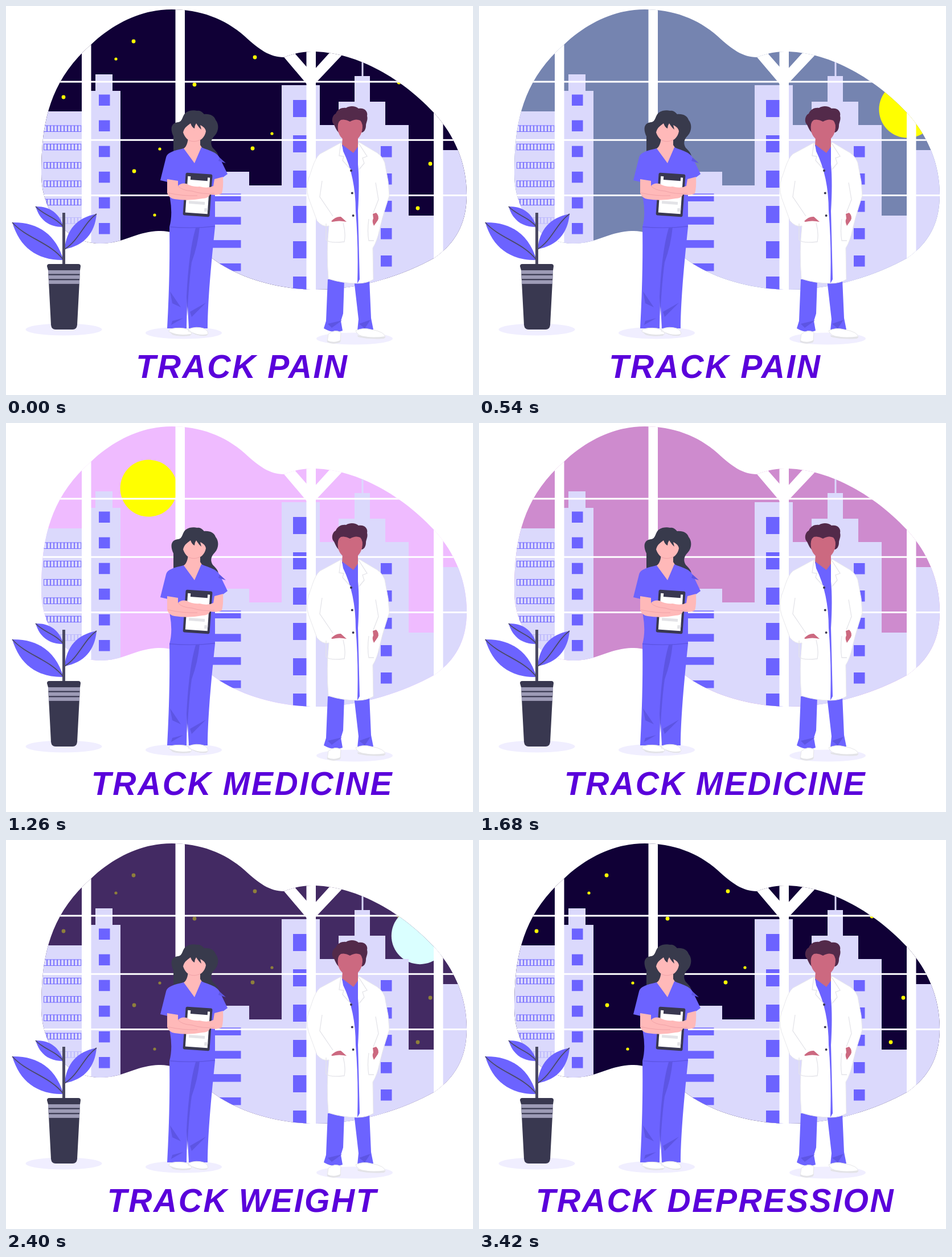
An HTML page that plays this animation: 820x683 px, repeating every 3.6 s.

```html
<!DOCTYPE html>
<html lang="en">
<head>
<meta charset="utf-8">
<title>Health tracker</title>
<style>
html, body { margin: 0; width: 100%; height: 100%; overflow: hidden; background: #fff; }
svg { display: block; width: 820px; height: 683px; }
#label { font: italic bold 57px "Liberation Sans", Arial, sans-serif; letter-spacing: 2.6px; fill: #5a00db; }
.blue { fill: #6c63ff; }
.fold { fill: #5d55e3; }
.dark { fill: #393850; }
.skin { fill: #ffb9b9; }
.tan { fill: #cc6980; }
.wall { fill: #dbd9fc; }
.seam { fill: none; stroke: #e4e4e9; stroke-width: 1.3; }
.crease { fill: none; stroke: #f1a3a8; }
.shoe { fill: #fff; stroke: #e6e6e9; }
.sole { fill: #e3e3e7; }
#shadows { fill: #f0eeff; }
#veins { fill: none; stroke: #4b4a68; stroke-width: 1.8; }
#panes { fill: none; stroke: #6c63ff; stroke-width: .9; }
</style>
</head>
<body>
<svg viewBox="0 0 820 683" xmlns="http://www.w3.org/2000/svg">
  <clipPath id="blob">
    <path d="M62 295C62 215 72 135 149 68C190 29 240 6 291 6C340 6 384 22 419 53C444 76 463 90 488 90C503 84 520 80 537 80C610 80 690 122 751 187C790 229 809 280 809 331C809 383 789 417 751 443C700 471 625 498 545 498C475 498 405 476 362 443C334 416 302 395 272 395C228 395 210 417 165 417C105 417 62 360 62 295Z"/>
  </clipPath>

  <g clip-path="url(#blob)">
    <rect id="sky" width="820" height="520"/>
    <g id="stars" fill="#ff0"></g>
    <circle id="sun" r="50" fill="#ff0"/>
    <circle id="moon" r="50" fill="#daffff"/>
    <g id="walls" class="wall"></g>
    <g id="windows" class="blue"></g>
    <g id="panes"></g>
    <path fill="#fff" d="M484 85L506 82L528 107V137ZM571 79L593 83L542 137V111Z"/>
    <g id="frame" fill="#fff"></g>
  </g>

  <g id="shadows"></g>

  <!-- plant -->
  <path id="leaves" class="blue"/>
  <path id="veins"/>
  <path fill="#4b4a62" d="M99 363H104V455H99Z"/>
  <path class="dark" d="M76 453H127Q131 453 131 457L130 464L125 560Q124 568 117 568H87Q80 568 79 560L74 464L72 457Q72 453 76 453Z"/>
  <g id="bands" fill="#9d9bb6"></g>

  <!-- nurse -->
  <path fill="#383a4c" d="M294 264V229C287 214 291 205 302 204C311 203 309 192 316 187C323 182 331 183 336 184C341 183 345 187 348 190C358 189 366 193 368 200C374 207 374 219 367 227C360 234 358 241 363 249C369 255 375 261 372 268L340 256L308 254Z"/>
  <path class="skin" d="M320 229H341V244L345 250L331 279L310 251Q319 248 320 229Z"/>
  <path class="skin" d="M311 222C313 213 318 211 324 206Q327 214 331 215Q331 210 334 206Q339 214 343 217L341 209Q350 213 351 220C349 231 341 238 331 238C320 238 314 231 311 222Z"/>
  <path class="crease" d="M321 236Q331 240 341 235"/>
  <path class="blue" d="M312 250C295 254 283 257 281 266L271 306L284 309L288 338Q293 366 287 388C288 450 286 510 283 566H317L318 510L321 566H354C354 520 360 455 367 388V304L378 303L389 295L376 268C371 256 356 254 343 248L331 276Z"/>
  <path class="fold" d="M287 387Q327 391 367 386V387.5Q327 392 287 388.5ZM288 501L307 529L292 522ZM333 390L340 388Q337 420 326 450Q321 485 318 545L317 510Q321 430 333 390ZM323 537L351 521L326 546ZM292 553L311 548L290 560ZM375 266L386 276L373 272Z"/>
  <g transform="rotate(4 336 332)">
    <rect class="dark" x="313" y="294" width="47" height="75" rx="3"/>
    <path fill="#fff" d="M317 300H356V364H317Z"/>
    <path class="dark" d="M322 298H352V306H322Z"/>
    <path class="sole" d="M322 343H350V348H322ZM350 354H356V360H350Z"/>
  </g>
  <path class="skin" d="M283 304L302 307V316Q307 310 317 312Q326 318 340 317Q354 321 364 316L366 304L381 300Q382 319 379 329Q372 333 358 331Q356 338 345 338Q319 343 296 339Q285 337 283 328Z"/>
  <path class="crease" d="M302 316Q309 324 327 325Q344 331 366 329M284 328Q310 334 336 333"/>
  <path class="shoe" d="M287 568Q296 564 313 566Q327 570 326 576Q309 580 297 576L286 572ZM321 567Q334 562 347 566Q357 571 354 577Q339 580 331 575L320 571Z"/>
  <path class="sole" d="M287 572Q299 579 325 576L323 579Q302 581 292 577ZM327 573Q340 579 354 576L352 579Q338 580 329 575Z"/>

  <!-- doctor -->
  <path class="blue" d="M565 480H594L592 540L588 553L591 570Q575 576 558 566L562 553ZM611 480H638L641 548L645 568Q631 573 617 570L619 550Z"/>
  <path class="fold" d="M565 558L590 552L572 565ZM620 558L640 551L630 566Z"/>
  <path class="shoe" d="M566 576Q577 567 588 573L587 589Q575 595 564 589ZM614 570Q627 564 641 568Q666 572 666 582Q650 586 633 581Q617 580 614 570Z"/>
  <path class="sole" d="M564 587Q576 593 588 586L586 591Q572 595 564 590ZM617 578Q640 584 666 580L664 584Q638 586 618 581Z"/>
  <path fill="#532a4a" d="M584 222C578 216 578 210 574 206C571 199 574 191 579 189C582 181 590 178 597 179C605 174 614 176 619 180C629 178 636 185 634 193C636 200 632 205 632 210C632 217 628 222 625 222Z"/>
  <path class="tan" d="M583 219Q581 204 588 200Q596 198 604 203Q614 197 622 201Q628 207 625 220C622 231 614 239 604 238C593 238 585 229 583 219Z"/>
  <path fill="#fff" stroke="#e8e8ec" d="M588 240L551 260C540 270 537 290 531 303Q526 319 531 336L546 377Q556 389 567 386Q562 430 566 479Q591 487 617 487Q634 487 645 480L644 425Q652 412 656 392Q660 374 667 352L673 333L671 308L665 275Q660 261 645 254L620 239L608 262Z"/>
  <path class="tan" d="M591 228H618V250L610 260L590 246Z"/>
  <path class="blue" d="M590 243L610 258L618 247V278Q621 310 618 360L621 480L617 487Q619 420 614 360Q614 300 592 255Z"/>
  <path class="seam" d="M588 240L585 263L593 264L591 271L606 288M620 242L634 264L626 267L629 276L620 287M555 307L551 335L574 369M649 310L654 340L645 363M562 382V410Q566 417 594 414Q597 399 592 381M637 374Q634 396 637 412H646"/>
  <path class="tan" d="M571 378Q579 369 588 370L598 379Q585 376 573 379ZM644 365L650 363Q656 369 653 376L646 386Q642 378 645 373Z"/>
  <g id="buttons" class="dark"></g>

  <text id="label" x="415" y="653" text-anchor="middle"></text>
</svg>
<script>
const LOOP = 3600, STEP = 60, LAST = 3420;
const words = ["PAIN", "MEDICINE", "WEIGHT", "DEPRESSION"];
const skyStops = [
  [0, "#100036"], [300, "#434a7a"], [780, "#a6bde6"], [1260, "#efbbff"],
  [1680, "#ce8bce"], [2400, "#432a63"], [2700, "#100036"], [LOOP, "#100036"]
];

const $ = id => document.getElementById(id);
const repeat = (n, f) => Array.from({ length: n }, (_, i) => f(i)).join("");
const rect = (x, y, w, h) => `<rect x="${x}" y="${y}" width="${w}" height="${h}"/>`;
const dot = (x, y, r) => `<circle cx="${x}" cy="${y}" r="${r}"/>`;
const column = (n, x, y, pitch, w, h) => repeat(n, i => rect(x, y + i * pitch, w, h));
const tower = (left, right, top) => rect(left, top, right - left, 510 - top);

// Two mirrored arcs from tip to base, plus a slightly wavy vein
function leaf(x, y, bx, by) {
  const dx = bx - x, dy = by - y;
  const at = (k, side) => `${x + dx * k - dy * side} ${y + dy * k + dx * side}`;
  const curve = (a, b) => `C${at(.33, a)} ${at(.67, b)} ${bx} ${by}`;
  const start = `M${x} ${y}`;
  return { shape: start + curve(.25, .25) + start + curve(-.25, -.25), vein: start + curve(.07, -.1) };
}

function build() {
  $("walls").innerHTML = tower(50, 133, 185) + tower(149, 201, 149) + tower(157, 187, 120) +
    tower(350, 427, 291) + tower(427, 484, 315) + tower(484, 551, 139) + tower(551, 707, 209) +
    tower(584, 666, 168) + tower(612, 639, 123) + tower(624.5, 627.5, 90) +
    tower(707, 767, 368) + tower(767, 820, 253);

  $("windows").innerHTML =
    column(6, 163, 155.5, 45.1, 19.5, 19.5) + column(6, 504, 165, 62, 30, 30) +
    column(5, 658, 246, 48, 19.5, 19.5) + column(4, 350, 329.5, 40.8, 62.5, 13.5);

  $("panes").innerHTML = repeat(6, row =>
    `<g opacity="${row < 5 ? 1 : .28}">${repeat(11, i => rect(66.5 + i * 6, 210 + row * 32.3, 5.2, 10.5))}</g>`);

  $("frame").innerHTML = [133, 297.5, 527.5, 751].map(x => rect(x, 0, 16.5, 510)).join("") +
    [131.5, 233.8, 331].map(y => rect(50, y, 770, 3)).join("");

  $("stars").innerHTML = [
    [224, 62], [437, 90], [101, 160], [331, 138], [433, 250], [225, 290], [690, 134], [745, 277], [723, 355],
    [193, 93], [467, 224], [270, 251], [261, 367]
  ].map(([x, y], i) => dot(x, y, i < 9 ? 3.4 : 2.6)).join("");

  $("shadows").innerHTML = [[101.5, 568], [312, 574], [612, 584]]
    .map(([x, y]) => `<ellipse cx="${x}" cy="${y}" rx="67" ry="10.5"/>`).join("");

  const leaves = [leaf(11, 380, 101, 446), leaf(52, 352, 101, 388), leaf(159, 365, 103, 427)];
  $("leaves").setAttribute("d", leaves.map(l => l.shape).join(""));
  $("veins").setAttribute("d", leaves.map(l => l.vein).join(""));
  $("bands").innerHTML = repeat(3, i => rect(74 + i * .4, 464 + i * 8.7, 56 - i * .8, 6.5));
  $("buttons").innerHTML = repeat(3, i => dot(606 + i * 1.8, 289 + i * 39.5, 2));
}

const clamp = v => Math.min(1, Math.max(0, v));
const rgb = hex => [1, 3, 5].map(i => parseInt(hex.slice(i, i + 2), 16));

function skyColor(t) {
  const i = skyStops.findIndex(([at]) => at > t);
  const [t0, from] = skyStops[i - 1], [t1, to] = skyStops[i];
  const end = rgb(to), k = (t - t0) / (t1 - t0);
  return `rgb(${rgb(from).map((v, j) => Math.round(v + (end[j] - v) * k))})`;
}

// Right to left along a shallow arc, fastest just past the middle
function orbit(el, t) {
  const x = 333 + 475 * Math.cos(Math.PI * (t - 260) / 1800);
  el.setAttribute("cx", x);
  el.setAttribute("cy", 91 + 0.00082 * (x - 420) ** 2);
  el.style.display = t > 400 && t < 1650 ? "" : "none";
}

function draw(t) {
  $("sky").setAttribute("fill", skyColor(t));
  $("stars").setAttribute("opacity", clamp(Math.max(1 - t / 500, (t - 2200) / 500)));
  orbit($("sun"), t);
  orbit($("moon"), t - LOOP / 2);
  $("label").textContent = "TRACK " + words[Math.floor(t / (LOOP / words.length))];
}

const start = performance.now();
function tick(now) {
  const t = Math.max(0, now - start) % LOOP;
  draw(Math.min(Math.floor(t / STEP) * STEP, LAST));
  requestAnimationFrame(tick);
}
build();
draw(0);
requestAnimationFrame(tick);
</script>
</body>
</html>
```
